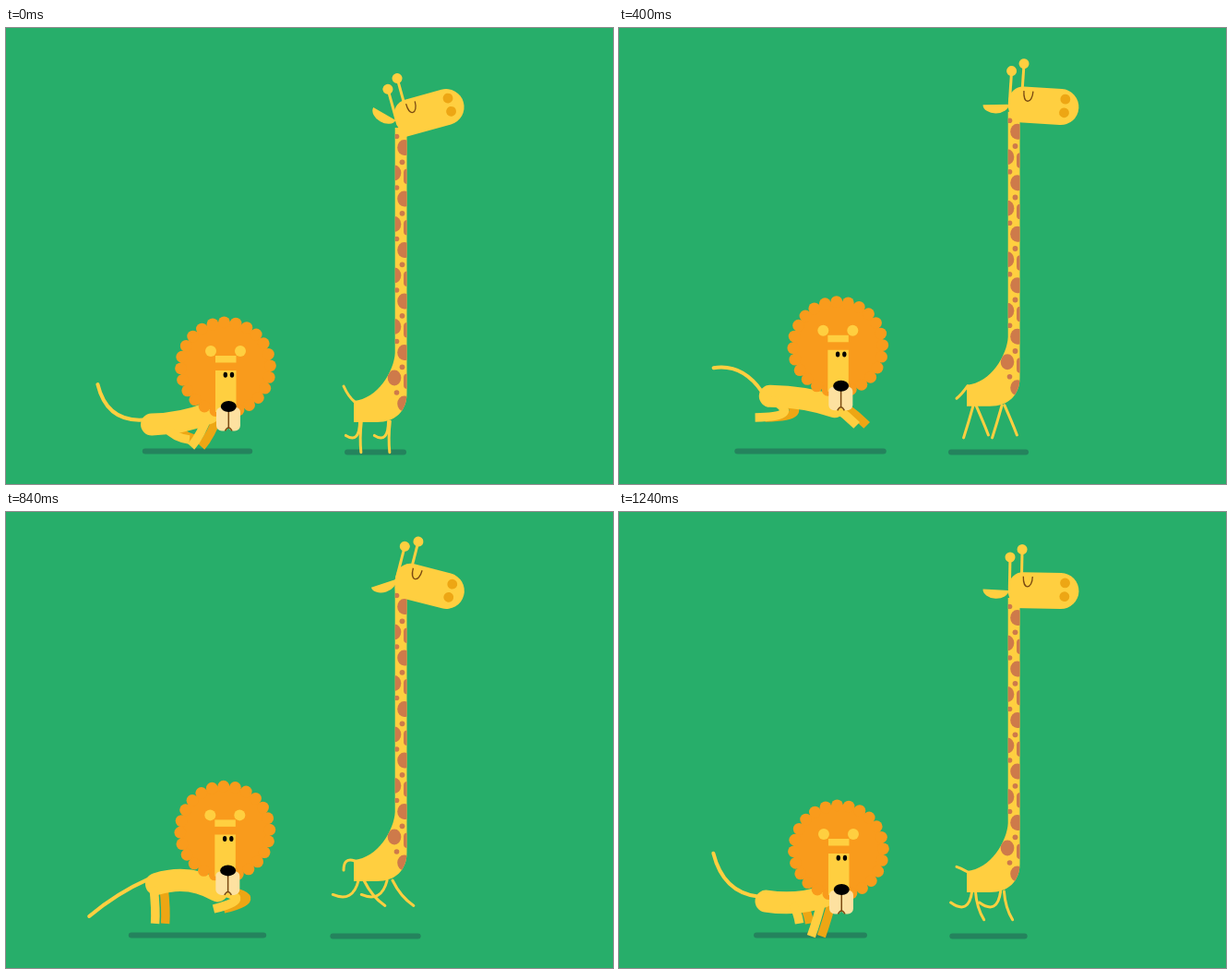
Recreate the animation shown at these times as an HTML page with a canvas. Size 658 by 494 pixels, loop 1280 ms.

```html
<!DOCTYPE html>
<html lang="en">
<head>
<meta charset="utf-8">
<title>Lion and giraffe</title>
<style>
html, body { margin: 0; width: 100%; height: 100%; overflow: hidden; background: #27ae6a; }
canvas { display: block; width: 658px; height: 494px; }
</style>
</head>
<body>
<canvas id="stage" width="658" height="494"></canvas>
<script>
const ctx = document.getElementById('stage').getContext('2d');

const GREEN = '#27ae6a', SHADOW = '#24835d', YELLOW = '#ffcf40', GOLD = '#eda614',
      ORANGE = '#f99b1c', SPOT = '#ce7a4a', CREAM = '#fde1a0', BROWN = '#7a4a12';

const STEP = 40, LOOP = 1280, RUN = 640, HOP = 320, RAD = Math.PI / 180;

// Motion helpers: a cosine, a short pulse and a jump, all periodic.
const wave = (t, peak, period = RUN) => Math.cos((t - peak) / period * 2 * Math.PI);
const pulse = (t, peak) => ((1 + wave(t, peak)) / 2) ** 4;

function hop(t, period, rise) {
  t %= period;
  const u = t < rise ? 1 - t / rise : (t - rise) / (period - rise);
  return 1 - u * u;
}

// Curve from a to b, its control point moved off the middle by (dx, dy).
function bow(a, b, dx, dy, color, width, cap = 'butt') {
  ctx.beginPath();
  ctx.moveTo(...a);
  ctx.quadraticCurveTo((a[0] + b[0]) / 2 + dx, (a[1] + b[1]) / 2 + dy, ...b);
  ctx.strokeStyle = color;
  ctx.lineWidth = width;
  ctx.lineCap = cap;
  ctx.stroke();
}

function oval(x, y, rx, ry, color, end = Math.PI * 2) {
  ctx.beginPath();
  ctx.ellipse(x, y, rx, ry, 0, 0, end);
  ctx.fillStyle = color;
  ctx.fill();
}

const dot = (x, y, r, color) => oval(x, y, r, r, color);

function box(x, y, w, h, color, radii = 0) {
  ctx.beginPath();
  ctx.roundRect(x, y, w, h, radii);
  ctx.fillStyle = color;
  ctx.fill();
}

const shadow = (x, y, half) => box(x - half, y - 3, half * 2, 6, SHADOW, 3);

// Run a drawing in a moved and turned frame.
function placed(x, y, degrees, draw) {
  ctx.save();
  ctx.translate(x, y);
  ctx.rotate(degrees * RAD);
  draw();
  ctx.restore();
}

function lionHead() {
  dot(238, 367.3, 49, ORANGE);
  for (let deg = -91.8; deg < 268; deg += 15)
    dot(238 + 48.5 * Math.cos(deg * RAD), 367.3 + 48.5 * Math.sin(deg * RAD), 6.4, ORANGE);
  dot(222, 350, 6, YELLOW);
  dot(254, 350, 6, YELLOW);
  box(227, 355, 22.5, 7.5, YELLOW);
  box(227, 371, 22.5, 45, YELLOW);
  for (const x of [237.8, 245]) oval(x, 375.7, 2.2, 3, '#000');
  box(228, 411, 13.3, 25.5, CREAM, [5, 0, 5, 6]);
  box(241, 411, 13, 25.5, CREAM, [0, 5, 6, 5]);
  bow([241.3, 414], [241.3, 433], 0, 0, BROWN, 1.5);
  bow([237.5, 436.5], [245, 436.5], 0, -7, BROWN, 1.5);
  oval(241.3, 410, 8.5, 6, '#000');
}

function drawLion(t) {
  const rise = t % RUN < RUN / 2 ? wave(t, RUN / 4, RUN * 2 - RUN + RUN) : 0;
  const lift = t % RUN < RUN / 2 ? Math.sin(t % RUN / RUN * Math.PI) : (1 + wave(t, 320)) / 2;
  const stretch = (1 + wave(t, 338)) / 2;
  const leap = hop(t, RUN, 340);

  const rump = [158 + 6 * leap, 429.5 - 32 * leap];
  const chest = [220 + 15 * stretch, 417 - 8 * lift];

  const hip = [rump[0] - 3 + 40 * pulse(t, 550), rump[1] + 3];
  const hindFoot = [170 + 29 * wave(t, 10), 446 - 24 * pulse(t, 400)];
  const hindBend = [5 + 40 * pulse(t, 400) - 15 * pulse(t, 80),
                    30 * pulse(t, 100) + 16 * pulse(t, 380) - 6];

  const foreFoot = [228 + 31 * wave(t, 370), 430 + 30 * pulse(t, 590)];
  const foreBend = [45 * pulse(t, 200), 10 * pulse(t, 60) - 6 * pulse(t, 280)];

  const swing = wave(t, 178), curl = wave(t, 15);
  const tailTip = [98 - 8 * swing, 394 + 45 * swing];

  const legs = (dx, color) => {
    const shift = ([x, y]) => [x + dx, y];
    bow(shift(hip), shift(hindFoot), ...hindBend, color, 9.5);
    bow(shift(chest), shift(foreFoot), ...foreBend, color, 9.5);
  };

  shadow(207.5, 458.5, 59.5 + 25 * stretch);
  bow([rump[0] - 9, rump[1] - 5], tailTip, -4 - 11 * curl, 22 * curl, YELLOW, 4, 'round');
  legs(11, GOLD);
  bow(rump, chest, 3, 12 * wave(t, 570) - 4, YELLOW, 24, 'round');
  legs(0, YELLOW);
  placed(-0.8 * lift, -26 * lift, 0, lionHead);
}

const neck = new Path2D('M421.7 108V352C421 371 403 402 377 404V427H402C422 427 434.5 415 434.5 396V108Z');
const muzzle = new Path2D('M0 19.5H52A19.5 19.5 0 0 0 52 -19.5H11A16 16 0 0 0 -5 -3.5V4Z');
const eye = new Path2D('M11 -15C11 -8 13 -4 15.7 -4C18.5 -4 21 -8 21 -15');

function drawSpots() {
  ctx.save();
  ctx.clip(neck);
  for (let y = 0; y < 278; y += 55.5) {
    dot(423.5, 117.5 + y, 2.8, SPOT);
    oval(431.7, 129.5 + y, 7.5, 8.5, SPOT);
    dot(429.5, 145.3 + y, 2.9, SPOT);
    oval(421, 157 + y, 7.3, 8.5, SPOT);
    box(431, 152.5 + y, 9, 16.5, SPOT, 4);
  }
  ctx.restore();
}

function giraffeHead() {
  for (const [x, y, base] of [[-3.7, -35.5, 0], [9.2, -44.2, -15]]) {
    bow([x, y], [x, base], 0, 0, YELLOW, 3);
    dot(x, y, 5.5, YELLOW);
  }
  ctx.fillStyle = YELLOW;
  ctx.fill(muzzle);
  ctx.strokeStyle = BROWN;
  ctx.lineWidth = 1.3;
  ctx.stroke(eye);
  dot(56.4, -8.7, 5.4, GOLD);
  dot(56, 6, 5.4, GOLD);
}

// One front and one hind leg at the same phase of the stride.
function giraffeLegs(t) {
  const sway = wave(t, 520), tuck = pulse(t, 270), kick = pulse(t, 550);
  for (const x of [385, 416])
    bow([x + 3 * sway, 426], [x - 3 + 29 * sway, 462 - 24 * tuck - 10 * kick],
        2 - 6 * wave(t, 580), 20 * tuck + 5 * kick, YELLOW, 3, 'round');
}

function giraffeTail(t) {
  const flick = wave(t, 40, HOP);
  bow([378, 405], [366, 388 + 33 * hop(t, HOP, 110)],
      3 * flick - 3, 7 * flick - 2, YELLOW, 3, 'round');
}

function drawGiraffe(t) {
  const height = 27 * hop(t, HOP, 200);
  const tilt = 1.11 * height - 15.5;
  shadow(400.5, 459.5, 33.5 + height * 0.58);
  placed(0, -height, 0, () => {
    giraffeTail(t);
    giraffeLegs(t + 30);
    giraffeLegs(t + 310);
    placed(422.5, 100, 5 - 1.6 * tilt, () => oval(-14, 0, 14, 9.5, YELLOW, Math.PI));
    placed(427, 99.5, tilt, giraffeHead);
    ctx.fillStyle = YELLOW;
    ctx.fill(neck);
    drawSpots();
  });
}

function render(now) {
  const t = Math.floor(now % LOOP / STEP) * STEP;
  ctx.fillStyle = GREEN;
  ctx.fillRect(0, 0, 658, 494);
  drawLion(t);
  drawGiraffe(t);
}

let start;
function tick(now) {
  start ??= now;
  render(now - start);
  requestAnimationFrame(tick);
}
render(0);
requestAnimationFrame(tick);
</script>
</body>
</html>
```
